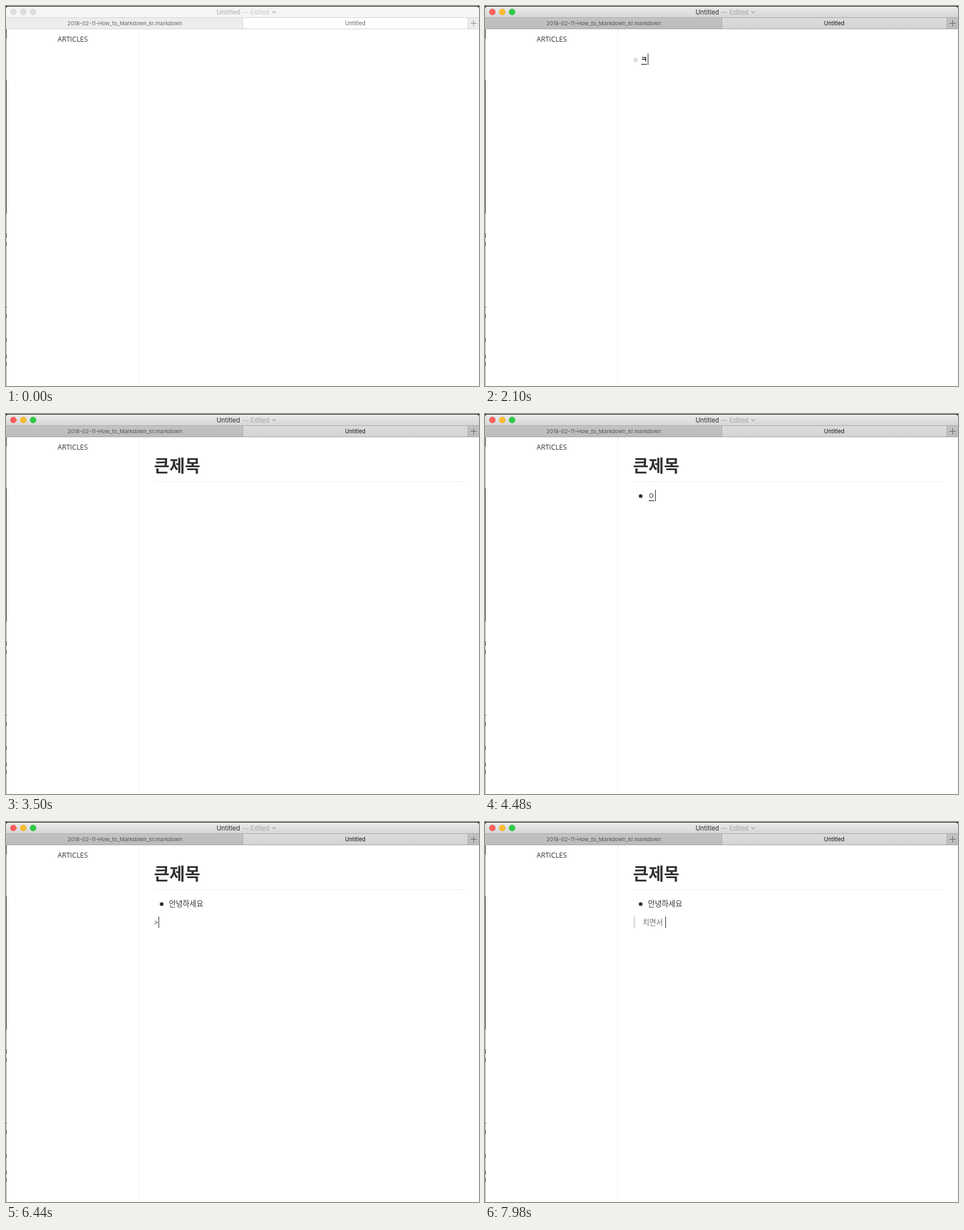
An HTML page that plays this animation: 834x671 px, repeating every 8000 ms.

```html
<!DOCTYPE html>
<html lang="ko">
<head>
<meta charset="utf-8">
<style>
html, body { margin: 0; width: 100%; height: 100%; overflow: hidden; background: #fff; }
svg { display: block; }
text { font-family: "Open Sans", "Noto Sans CJK KR", "Noto Sans CJK", sans-serif; font-size: 13.15px; fill: #333; white-space: pre; }
.ui { font-family: Inter, Roboto, sans-serif; }
.ko { font-family: "Noto Sans CJK KR", "Noto Sans CJK", sans-serif; }
.bold { font-weight: 700; }
.title { font-size: 11.3px; fill: #2b2b2b; }
.edited { font-size: 11.3px; fill: #a3a3a3; }
.tab { font-size: 9.5px; fill: #555; text-anchor: middle; }
.front { font-size: 9.8px; fill: #111; }
.chevron { fill: none; stroke: #999; stroke-width: 1.1; }
.plus { stroke: #666; }
.edge { fill: #a9a9a9; }
.idle .title { fill: #b4b4b4; font-weight: 500; }
.idle .edited { fill: #c6c6c6; }
.idle .tab { fill: #666; }
.idle .bar { fill: #f6f6f6; }
.idle .back { fill: #ededed; }
.idle .active { fill: #fff; }
.idle .light { fill: #dddddd; stroke: #d0d0d0; }
.idle .edge { fill: #d4d4d4; }
.idle .plus { stroke: #888; }
</style>
</head>
<body>
<svg id="stage" class="idle" width="834" height="671" viewBox="0 0 834 671">
  <defs>
    <linearGradient id="barFill" x2="0" y2="1"><stop stop-color="#ebebeb"/><stop offset="1" stop-color="#d6d6d6"/></linearGradient>
    <linearGradient id="backFill" x2="0" y2="1"><stop stop-color="#c3c3c3"/><stop offset="1" stop-color="#bcbcbc"/></linearGradient>
    <linearGradient id="activeFill" x2="0" y2="1"><stop stop-color="#dcdcdc"/><stop offset="1" stop-color="#d3d3d3"/></linearGradient>
  </defs>
  <rect width="834" height="671" fill="#fff"/>
  <rect width="834" height="10" fill="#111"/>
  <path class="bar" fill="url(#barFill)" d="M0 20V5q0-4 4-4H830q4 0 4 4V20Z"/>
  <rect class="back" fill="url(#backFill)" y="20" width="834" height="20"/>
  <rect class="active" fill="url(#activeFill)" x="418" y="20" width="396" height="20"/>
  <path class="edge" d="M0 20H834V21H0ZM0 40H834V41H0ZM417 20h1V40h-1ZM814 20h1V40h-1Z"/>
  <g stroke-width=".6">
    <circle class="light" cx="13" cy="10.5" r="5.3" fill="#f9605a" stroke="#e04a45"/>
    <circle class="light" cx="30.5" cy="10.5" r="5.3" fill="#fdbb2f" stroke="#dfa023"/>
    <circle class="light" cx="47.8" cy="10.5" r="5.3" fill="#2dcb44" stroke="#22ad35"/>
  </g>
  <text class="ui title" x="371.2" y="15">Untitled</text>
  <text class="ui edited" x="416.5" y="15">— Edited</text>
  <path class="chevron" d="M469.5 9.2l3.2 3 3.2-3"/>
  <text class="ui tab" x="209.5" y="34">2018-02-11-How_to_Markdown_kr.markdown</text>
  <text class="ui tab front" x="615.7" y="34">Untitled</text>
  <path class="plus" d="M819 30.5H830M824.5 25V36"/>
  <!-- desktop showing past the window's left edge -->
  <path stroke="#aaa" d="M.5 41V671"/>
  <path stroke="#222" d="M.5 41V57M.5 131V367M.5 401v8M.5 417v6M.5 531v2M.5 543v8M.5 587v6M.5 616v6M.5 629v6"/>
  <text x="91" y="63" style="font-size:12.25px">ARTICLES</text>
  <rect x="234" y="41" width="1" height="630" fill="#f3f3f3"/>

  <text id="raw" x="261"></text>
  <text id="hash" x="261.5" y="99.5" fill="#bbb" style="fill:#bbb">#</text>
  <g id="heading">
    <text class="ko bold" x="261" y="102" style="font-size:29.6px">큰제목</text>
    <rect x="261" y="119" width="547" height="1" fill="#eee"/>
  </g>
  <circle id="bullet" cx="274.5" cy="145" r="3.3" fill="#333"/>
  <circle id="bullet2" cx="274.5" cy="173" r="3.3" fill="#333"/>
  <text id="item" class="ko" x="287.3" y="149.3">안녕하세요</text>
  <rect id="quoteBar" x="261.5" y="167" width="3.5" height="21" fill="#dfe2e5"/>
  <text id="line" class="ko"></text>
  <rect id="under" width="10" height="1.4" fill="#333"/>
  <rect id="caret" width="1" height="20" fill="#222"/>
</svg>
<script>
const $ = id => document.getElementById(id);
const ADVANCE = 12.1, SPACE = 4;
const rawWidth = { '': 0, '#': 9, '-': 5, '>': 8 };

// Text origin and caret top of each kind of line; stage says how much of the page is finished.
const modes = {
  top:   { x: 261, y: 84, raw: true, stage: 0 },
  title: { x: 274.5, y: 84, stage: 1 },
  para:  { x: 261, y: 134, raw: true, stage: 2 },
  item:  { x: 287.6, y: 134, stage: 3 },
  next:  { x: 287.6, y: 162, stage: 4 },
  after: { x: 261, y: 167, raw: true, stage: 5 },
  quote: { x: 278, y: 167, stage: 6 }
};

// Start time, line kind, text; a trailing "_" marks a syllable still being composed.
const steps = [
  [490, 'top', ''], [910, 'top', '#'], [1190, 'title', ''],
  [1680, 'title', 'ㅋ_'], [2170, 'title', '크_'], [2240, 'title', '큰_'],
  [2450, 'title', '큰ㅈ_'], [2520, 'title', '큰제_'], [2660, 'title', '큰젬_'],
  [2730, 'title', '큰제모_'], [2800, 'title', '큰제목_'], [2870, 'title', '큰제목'],
  [3010, 'para', ''], [4130, 'para', '-'], [4340, 'item', ''],
  [4480, 'item', 'ㅇ_'], [4550, 'item', '아_'], [4620, 'item', '안_'],
  [4830, 'item', '안ㄴ_'], [4900, 'item', '안녀_'], [5040, 'item', '안녕_'],
  [5180, 'item', '안녕ㅎ_'], [5250, 'item', '안녕하_'], [5320, 'item', '안녕핫_'],
  [5390, 'item', '안녕하세_'], [5460, 'item', '안녕하셍_'], [5530, 'item', '안녕하세요_'],
  [5600, 'item', '안녕하세요'], [5950, 'next', ''], [6160, 'after', ''],
  [6440, 'after', '>'], [6650, 'quote', ''],
  [7210, 'quote', 'ㅊ_'], [7350, 'quote', '치_'], [7420, 'quote', '침_'],
  [7490, 'quote', '치며_'], [7630, 'quote', '치면_'],
  [7770, 'quote', '치면ㅅ_'], [7840, 'quote', '치면서_'], [7980, 'quote', '치면서 ']
];

const show = (id, on) => $(id).style.display = on ? '' : 'none';
const place = (id, x, y) => { $(id).setAttribute('x', x); $(id).setAttribute('y', y); };

function draw(t) {
  const idle = t < 490;
  const [, kind, typed] = steps.findLast(s => s[0] <= t) || steps[0];
  const { x, y, raw, stage } = modes[kind];
  const composing = typed.endsWith('_');
  const text = typed.replace('_', '');
  const width = raw ? rawWidth[text]
    : [...text].reduce((w, c) => w + (c === ' ' ? SPACE : ADVANCE), 0);

  $('stage').classList.toggle('idle', idle);
  show('hash', stage === 1);
  show('heading', stage >= 2);
  show('bullet', stage >= 3);
  show('item', stage >= 4);
  show('bullet2', stage === 4);
  show('quoteBar', stage === 6);

  $('raw').textContent = raw ? text : '';
  place('raw', 261, y + 15);
  $('line').textContent = raw ? '' : text;
  $('line').style.fill = stage === 6 ? '#777' : '';
  $('line').classList.toggle('bold', stage === 1);
  place('line', x - .3, y + (stage === 6 ? 14.5 : 15.4));

  show('under', composing);
  place('under', x + width - ADVANCE + 1, y + 18.3);
  show('caret', !idle && !(t >= 3500 && t < 3990));
  place('caret', Math.round(x + width), y);
}

function frame() {
  draw(performance.now() % 8000);
  requestAnimationFrame(frame);
}
frame();
</script>
</body>
</html>
```
